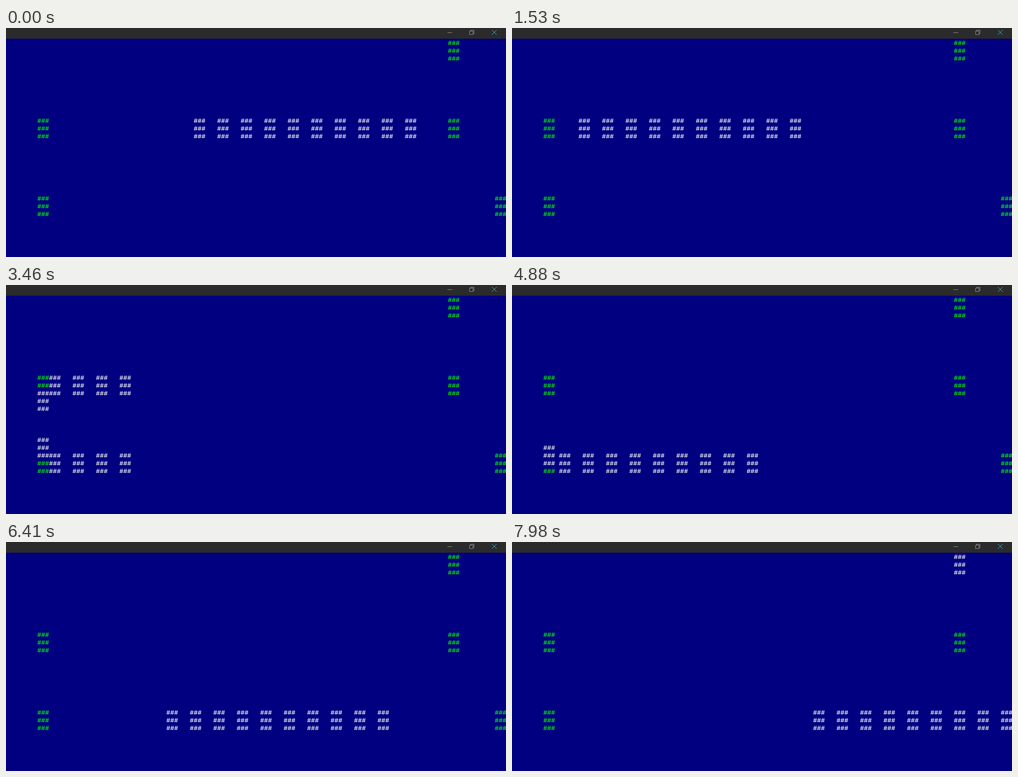
An HTML page for the animation above (8000 ms loop, 1023 by 471 pixels).

```html
<!DOCTYPE html>
<html lang="en">
<head>
<meta charset="utf-8">
<title>Console path</title>
<style>
  html, body { margin: 0; width: 100%; height: 100%; overflow: hidden; background: #000080; }
  svg { display: block; }
  text { font: bold 13.333px "Liberation Mono", "DejaVu Sans Mono", monospace; white-space: pre; }
  .icon { fill: none; stroke-width: 1; }
</style>
</head>
<body>
<svg id="stage" width="1023" height="471" viewBox="0 0 1023 471">
  <rect width="1023" height="471" fill="#000080"/>
  <rect width="1023" height="22" fill="#2b2b2b"/>
  <path class="icon" stroke="#8c8c8c" d="M903 9.5h10"/>
  <path class="icon" stroke="#8c8c9c" d="M948.5 6.5h7v7h-7zM950.5 6.5v-2h7v7h-2"/>
  <path class="icon" stroke="#45b5bd" d="M994 4l10 10M1004 4l-10 10"/>
</svg>
<script>
const LOOP = 8000, COUNT = 10, GAP = 6;
const CELL_W = 8, CELL_H = 16, TOP = 22;
const stage = document.getElementById('stage');

// Turning points of the route, in character cells.
const route = [[113, 0], [113, 10], [8, 10], [8, 20], [125, 20]];

// Bursts of redraws: first time, last time, redraws, head tick at the end.
const bursts = [
  [70, 830, 12, 17], [900, 1670, 12, 34], [1740, 2510, 12, 52],
  [2580, 3330, 12, 70], [3390, 4140, 12, 88], [4210, 5010, 13, 107],
  [5070, 5820, 12, 126], [5890, 6680, 13, 145], [6750, 7510, 12, 162],
  [7560, 7980, 7, 175]
];

const redraws = [[0, 0]];
let tick = 0;
for (const [from, to, steps, end] of bursts) {
  for (let i = 0; i < steps; i++) {
    const time = from + (to - from) * i / (steps - 1);
    redraws.push([Math.floor(time / 10 + 1e-6) * 10, Math.round(tick + (end - tick) * (i + 1) / steps)]);
  }
  tick = end;
}

function add(parent, name, attrs) {
  const el = document.createElementNS('http://www.w3.org/2000/svg', name);
  for (const key in attrs) el.setAttribute(key, attrs[key]);
  return parent.appendChild(el);
}

function block(color) {
  const g = add(stage, 'g', {});
  add(g, 'rect', { width: 3 * CELL_W, height: 3 * CELL_H, fill: '#000080' });
  for (let row = 0; row < 3; row++) {
    add(g, 'text', { x: 0, y: 13 + row * CELL_H, fill: color }).textContent = '###';
  }
  return g;
}

function place(g, cell) {
  g.style.display = cell ? '' : 'none';
  if (cell) g.setAttribute('transform', `translate(${cell[0] * CELL_W} ${TOP + cell[1] * CELL_H})`);
}

// Cell after a number of ticks; each turning point costs one extra tick.
function cellAt(age) {
  if (age < 0) return null;
  for (let i = 0; i < route.length; i++) {
    const [x, y] = route[i];
    if (age-- === 0) return [x, y];
    if (i === route.length - 1) return null;
    const dx = route[i + 1][0] - x, dy = route[i + 1][1] - y;
    const length = Math.abs(dx) + Math.abs(dy);
    if (age <= length) return [x + Math.sign(dx) * age, y + Math.sign(dy) * age];
    age -= length;
  }
}

for (const point of route) place(block('#00ff00'), point);
const walkers = Array.from({ length: COUNT + 1 }, () => block('#ffffff'));

const HEAD_AGE = 77, RESPAWN = 175;
let shown = -1;

function draw(now) {
  const time = now % LOOP;
  let index = redraws.length - 1;
  while (redraws[index][0] > time) index--;
  if (index !== shown) {
    shown = index;
    const head = redraws[index][1];
    walkers.forEach((g, i) => {
      const age = i < COUNT ? HEAD_AGE + head - i * GAP : head - RESPAWN;
      place(g, cellAt(age));
    });
  }
}

function frame() {
  draw(performance.now());
  requestAnimationFrame(frame);
}
frame();
</script>
</body>
</html>
```
